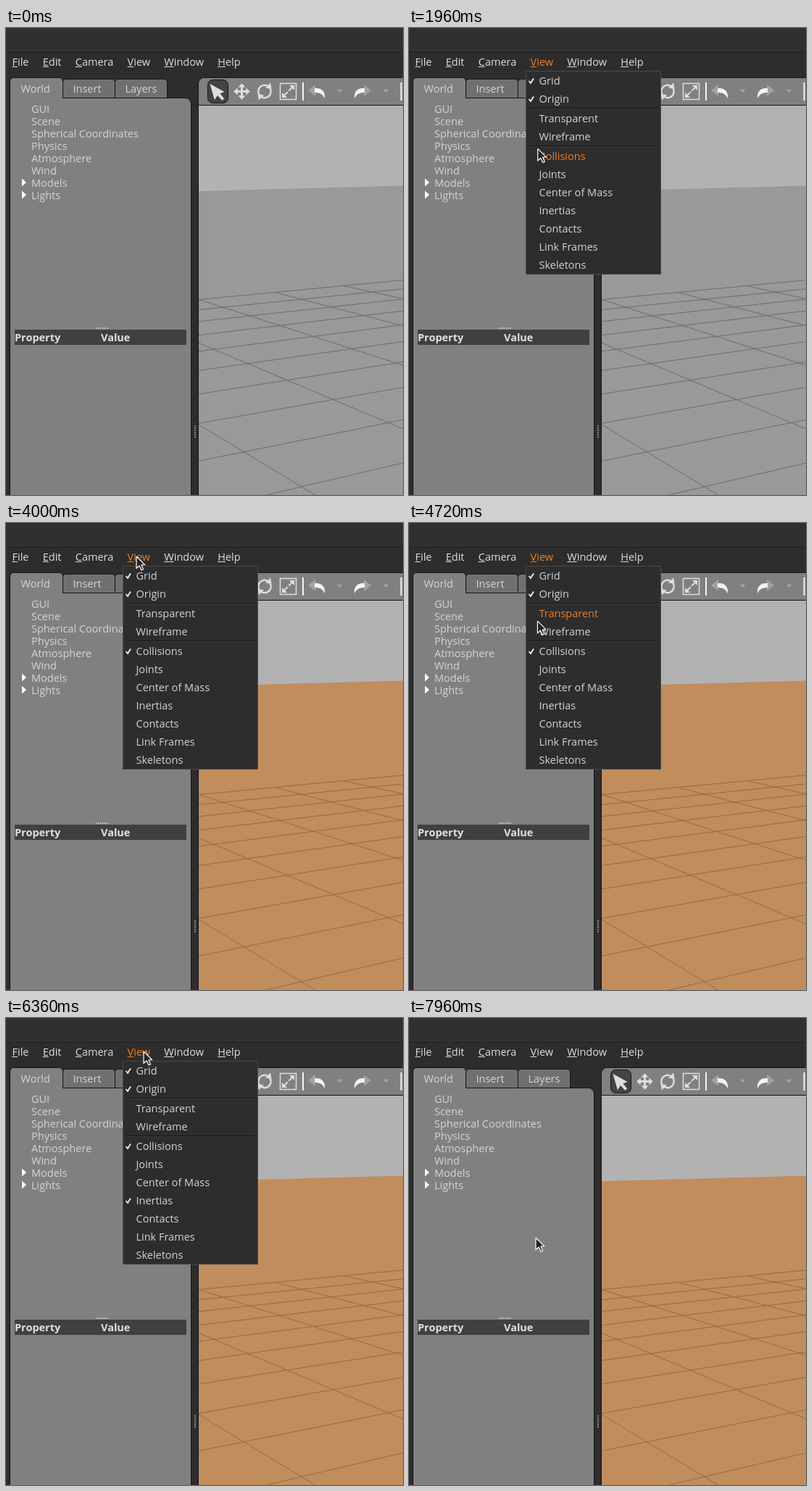
An HTML page with a canvas that plays this animation: 548 px wide and 644 px high, repeating every 8000 ms.

```html
<!DOCTYPE html>
<html lang="en">
<head>
<meta charset="utf-8">
<title>Simulator view menu</title>
<style>
html, body { margin: 0; width: 100%; height: 100%; overflow: hidden; background: #2d2d2d; }
canvas { display: block; }
</style>
</head>
<body>
<canvas id="stage" width="548" height="644"></canvas>
<script>
const ctx = document.getElementById('stage').getContext('2d');
const LOOP = 8000;
const ACCENT = '#ee7e20', PALE = '#d4d4d4', ICON = '#dedede', FADED = '#a2a2a2';
const PANEL = '#808080', DARK = '#2d2d2d', EDGE = '#151515';
const FONT = '14.5px "Open Sans", "Noto Sans", sans-serif';

const menuBar = ['File', 'Edit', 'Camera', 'View', 'Window', 'Help'];
const tabs = ['World', 'Insert', 'Layers'];
const treeRows = ['GUI', 'Scene', 'Spherical Coordinates', 'Physics', 'Atmosphere', 'Wind', 'Models', 'Lights'];
const menuGroups = [
  ['Grid', 'Origin'],
  ['Transparent', 'Wireframe'],
  ['Collisions', 'Joints', 'Center of Mass', 'Inertias', 'Contacts', 'Link Frames', 'Skeletons']];

// Vertical middle of every label the cursor can visit
const rowY = { View: 45 };
treeRows.forEach((label, i) => rowY[label] = 112 + 17 * i);
menuGroups.flat().forEach((label, i) => {
  const group = menuGroups.findIndex(labels => labels.includes(label));
  rowY[label] = 73 + 25 * i + 2 * group;
});

// Cursor moves: start, duration, x, label to reach
const moves = [
  [40, 600, 182, 'Models'], [640, 460, 181, 'View'],
  [1640, 670, 174, 'Link Frames'], [2640, 160, 174, 'Collisions'],
  [3240, 560, 180, 'View'], [4240, 1060, 174, 'Inertias'],
  [5660, 500, 190, 'View'], [6600, 1000, 175, 'Link Frames']];
const clicks = { Collisions: 3200, Inertias: 5640, 'Link Frames': 7940 };

function cursorAt(t) {
  let x = 290, y = -20;
  for (const [start, duration, toX, label] of moves) {
    const u = Math.min(1, Math.max(0, (t - start) / duration));
    const eased = u * u * (3 - 2 * u);
    x += (toX - x) * eased;
    y += (rowY[label] + 1 - y) * eased;
  }
  return { x, y };
}

function isMenuOpen(t) {
  const opened = moves.filter(move => move[3] === 'View')
    .map(([start, duration]) => start + duration + 80).filter(time => time <= t).pop();
  return opened !== undefined && !Object.values(clicks).some(click => click > opened && click <= t);
}

function rect(x, y, w, h, color) {
  ctx.fillStyle = color;
  ctx.fillRect(x, y, w, h);
}

function rounded(x, y, w, h, radii, fill, stroke = EDGE) {
  ctx.beginPath();
  ctx.roundRect(x + 0.5, y + 0.5, w, h, radii);
  ctx.fillStyle = fill;
  ctx.fill();
  ctx.strokeStyle = stroke;
  ctx.lineWidth = 1;
  ctx.stroke();
}

function text(str, x, middle, color = PALE, weight = '') {
  ctx.font = `${weight} ${FONT}`;
  ctx.fillStyle = color;
  ctx.fillText(str, x, middle + 5);
}

function tracePath(points) {
  ctx.beginPath();
  points.forEach(([x, y]) => ctx.lineTo(x, y));
}

function polygon(points, color) {
  tracePath(points);
  ctx.fillStyle = color;
  ctx.fill();
}

function polyline(points, color, width = 1) {
  tracePath(points);
  ctx.strokeStyle = color;
  ctx.lineWidth = width;
  ctx.stroke();
}

function at(x, y, draw, { turn = 0, sx = 1, sy = 1 } = {}) {
  ctx.save();
  ctx.translate(x, y);
  ctx.rotate(turn);
  ctx.scale(sx, sy);
  draw();
  ctx.restore();
}

// Right-pointing triangle centred on x, y before turning
function triangle(x, y, depth, half, color, turn = 0) {
  at(x, y, () => polygon([[-depth / 2, -half], [depth / 2, 0], [-depth / 2, half]], color), { turn });
}

function pointer(fill, outline) {
  const shape = [[0, 0], [0, 16.5], [4, 13], [7, 19], [9.5, 18], [7, 12], [11.5, 11.5], [0, 0]];
  polygon(shape, fill);
  if (outline) polyline(shape, outline, 1.2);
}

function drawScene(warm) {
  const color = warm ? '#98693d' : '#6c6c6c';
  ctx.save();
  ctx.beginPath();
  ctx.rect(266, 107, 282, 537);
  ctx.clip();
  rect(266, 107, 282, 537, '#b2b2b2');
  polygon([[266, 225], [548, 217.5], [548, 644], [266, 644]], warm ? '#c18d5d' : '#999999');

  // Two families of grid lines, evenly spaced in depth, each with its vanishing point
  const right = [2366, 174.5], left = [-343, 178.5];
  for (let k = 0; k < 10; k++) polyline([[266, 176.5 + 1 / (0.00505 - 0.000334 * k)], right], color);
  for (let k = 0; k < 5; k++) {
    const distance = 1e4 / (4.262 + 0.25 * k);
    const x = right[0] - distance, y = right[1] + distance * 0.0952;
    polyline([[x, y], [x + 3 * (x - left[0]), y + 3 * (y - left[1])]], color);
  }
  ctx.restore();
}

function historyArrow() {
  triangle(-7, -2, 10, 8, FADED, Math.PI);
  ctx.beginPath();
  ctx.moveTo(-3, -5);
  ctx.bezierCurveTo(7, -6, 12, 0, 11, 9);
  ctx.bezierCurveTo(8, 3, 4, 1, -3, 1);
  ctx.fill();
}

function drawToolbar() {
  rounded(265, 68, 300, 600, [8, 0, 0, 0], PANEL);
  rect(266, 106, 282, 1, '#111');
  rounded(278, 71, 28, 32, 7, '#444');
  at(281.5, 77, () => pointer(ICON), { turn: -0.28, sx: 1.4, sy: 1.4 });

  for (let i = 0; i < 4; i++) at(325.5, 87.5, () => {
    rect(0, -1.5, 8, 3, ICON);
    triangle(8.5, 0, 5.5, 5, ICON);
  }, { turn: i * Math.PI / 2 });

  ctx.strokeStyle = ICON;
  ctx.lineWidth = 1.5;
  ctx.strokeRect(378.5, 76.5, 22, 22);
  for (const turn of [0, Math.PI]) {
    at(357, 87.5, () => {
      ctx.beginPath();
      ctx.arc(0, 0, 8.7, Math.PI * 0.83, Math.PI * 1.68);
      ctx.lineWidth = 2.4;
      ctx.stroke();
      triangle(7, -6, 7, 5, ICON, Math.PI / 4);
    }, { turn });
    at(389.5, 87.5, () => {
      rect(1, -1, 8, 2, ICON);
      triangle(9.5, 0, 5, 5, ICON);
    }, { turn: turn - Math.PI / 4 });
  }

  for (const x of [409, 544.5]) rect(x, 75, 2, 25, '#f4f4f4');
  at(429, 88, historyArrow);
  at(492, 88, historyArrow, { sx: -1 });
  for (const x of [460.5, 524.5]) triangle(x, 87, 4.5, 4, FADED, Math.PI / 2);
}

function drawSidebar(cursor, open) {
  rounded(5, 96, 250, 580, [0, 8, 0, 0], PANEL);
  tabs.forEach((label, i) => {
    const x = 6 + 72 * i;
    if (i) rounded(x, 70, 72, 26, [4, 4, 0, 0], '#707070');
    else rounded(x - 1, 68, 73, 28, [5, 5, 0, 0], PANEL);
    text(label, x + 14.5, 84);
  });
  rect(6, 96, 72, 2, PANEL);

  treeRows.forEach((label, i) => {
    const y = rowY[label];
    const hovered = !open && cursor.x < 249 && Math.abs(cursor.y - y) <= 8.5;
    text(label, 35, y, hovered ? '#fff' : PALE);
    if (i > 5) triangle(25, y - 1, 6, 5.5, '#fff');
  });

  for (let i = 0; i < 6; i++) {
    rect(124 + 3 * i, 413, 1.5, 2, '#c4c4c4');
    rect(260, 548 + 3 * i, 2, 1.5, '#a0a0a0');
  }
  rect(12, 416, 237, 21, '#404040');
  text('Property', 12, 427, '#e0e0e0', 'bold');
  text('Value', 131, 427, '#e0e0e0', 'bold');
}

function drawMenuBar(active) {
  rect(0, 0, 548, 33, '#322f30');
  rect(0, 33, 548, 1, '#202020');
  let x = 8.5;
  for (const label of menuBar) {
    const color = label === 'View' && active ? ACCENT : ICON;
    text(label, x, 47, color);
    rect(x, 53, ctx.measureText(label[0]).width, 1, color);
    x += ctx.measureText(label).width + 19.3;
  }
}

function drawMenu(cursor, t) {
  rounded(161, 59, 186, 280, 0, DARK, '#4a4a4a');
  menuGroups.forEach((labels, group) => {
    if (group) {
      const y = rowY[labels[0]] - 15;
      rect(164, y, 180, 1, '#191919');
      rect(164, y + 1, 180, 1, '#393939');
    }
    for (const label of labels) {
      const y = rowY[label];
      text(label, 179.5, y, Math.abs(cursor.y - y) < 12 ? ACCENT : PALE);
      if (group === 0 || t >= clicks[label]) polyline([[165.5, y], [168, y + 3], [172, y - 3.5]], '#f4f4f4', 1.8);
    }
  });
}

function draw(t) {
  const cursor = cursorAt(t);
  const open = isMenuOpen(t);
  rect(0, 0, 548, 644, DARK);
  drawMenuBar(open || Math.abs(cursor.y - rowY.View) < 10);
  drawToolbar();
  drawScene(t >= clicks.Collisions);
  drawSidebar(cursor, open);
  if (open) drawMenu(cursor, t);
  at(cursor.x, cursor.y, () => pointer('#222', '#fff'));
}

const start = performance.now();
function frame() {
  draw((performance.now() - start) % LOOP);
  requestAnimationFrame(frame);
}
frame();
</script>
</body>
</html>
```
